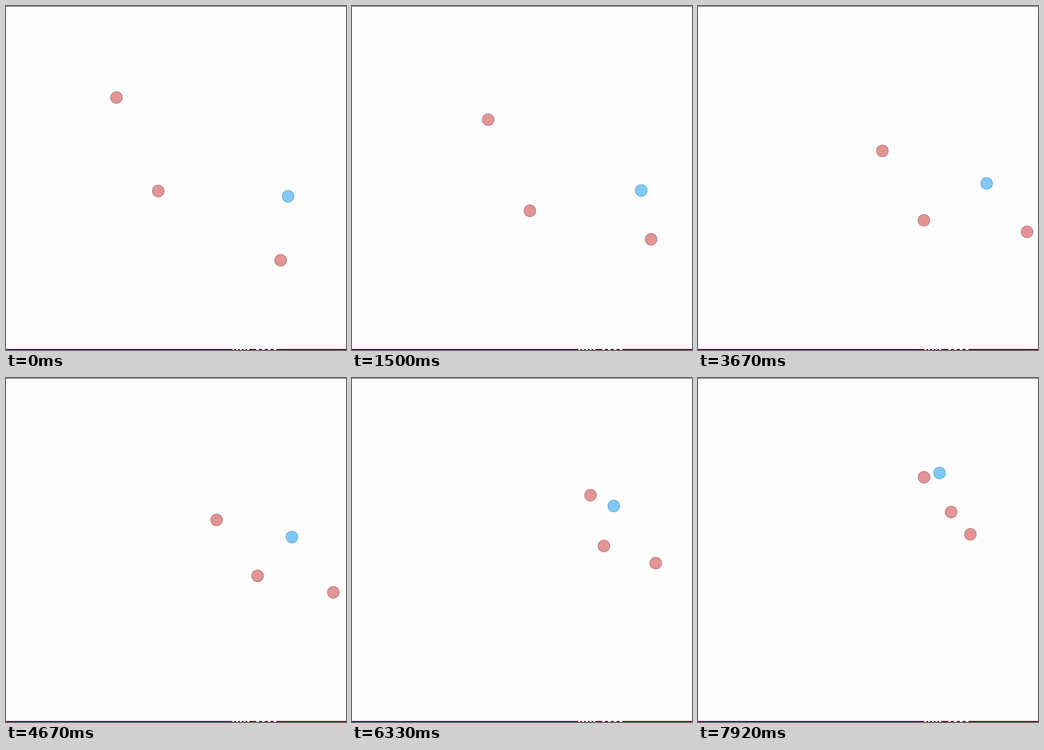
Write an HTML page with a canvas that moves like this. It is 640 by 648 pixels and loops after 8000 ms.

```html
<!DOCTYPE html>
<html lang="en">
<head>
<meta charset="utf-8">
<title>Four moving dots</title>
<style>
  html, body { margin: 0; width: 100%; height: 100%; overflow: hidden; background: #fdfdfd; }
  canvas { display: block; }
</style>
</head>
<body>
<canvas id="stage" width="640" height="648"></canvas>
<script>
const ctx = document.getElementById('stage').getContext('2d');
const LOOP = 8000, FPS = 12, LAST = 91;
const PINK = ['#e39494', '#b47c84'], BLUE = ['#7fc8f8', '#6aa9cc'];

// Each path is a smooth curve through points evenly spaced in time
const dots = [
  [PINK, [[208, 172.5], [257, 214.7], [332, 269.5], [405.5, 264], [449.5, 219], [425.5, 187]]],
  [PINK, [[286.5, 348.5], [335.5, 386], [410, 408], [479.5, 365.5], [474, 314], [476.5, 252.5]]],
  [PINK, [[517, 479], [563.5, 439.3], [616, 430], [613, 398], [569.5, 346.5], [512.7, 294.5]]],
  [BLUE, [[531, 358.5], [544.5, 347.5], [544, 341], [535, 292], [491, 238.5], [454.7, 179]]]
];

// Catmull-Rom through a, b, c, d, between b and c
function spline(a, b, c, d, u) {
  return b + u / 2 * (c - a + u * (2 * a - 5 * b + 4 * c - d + u * (3 * (b - c) + d - a)));
}

function along(path, s) {
  const last = path.length - 1, i = Math.min(Math.floor(s * last), last - 1);
  return [0, 1].map(k => {
    const b = path[i][k], c = path[i + 1][k];
    const a = i > 0 ? path[i - 1][k] : 2 * b - c;
    const d = i + 2 <= last ? path[i + 2][k] : 2 * c - b;
    return spline(a, b, c, d, s * last - i);
  });
}

// Progress from 0 to 1; the dots rest for three ticks, later for one
function progress(t) {
  const tick = Math.floor((t + 5) * FPS / 1000);
  const rest = Math.min(Math.max(tick - 30, 0), 3) + (tick > 38 ? 1 : 0);
  return Math.min((tick - rest) / LAST, 1);
}

function box(color, x, y, w, h) {
  ctx.fillStyle = color;
  ctx.fillRect(x, y, w, h);
}

function edges() {
  box('#fdfdfd', 0, 0, 640, 648);
  box('#3a3a36', 0, 0, 640, 1);
  box('#640a4a', 0, 646, 424, 2);
  box('#640f1a', 424, 646, 216, 2);
  // Tops of a clipped caption
  for (let x = 426; x < 460; x += 7) box('#fdfdfd', x, 646, 4, 2);
  for (let x = 471; x < 506; x += 11) box('#fdfdfd', x, 646, 5, 2);
}

function draw(now) {
  const s = progress(now % LOOP);
  edges();
  ctx.lineWidth = 1.2;
  for (const [[fill, line], path] of dots) {
    ctx.beginPath();
    ctx.arc(...along(path, s), 11.1, 0, Math.PI * 2);
    ctx.fillStyle = fill;
    ctx.strokeStyle = line;
    ctx.fill();
    ctx.stroke();
  }
}

let start;
function frame(now) {
  start ??= now;
  draw(now - start);
  requestAnimationFrame(frame);
}
draw(0);
requestAnimationFrame(frame);
</script>
</body>
</html>
```
